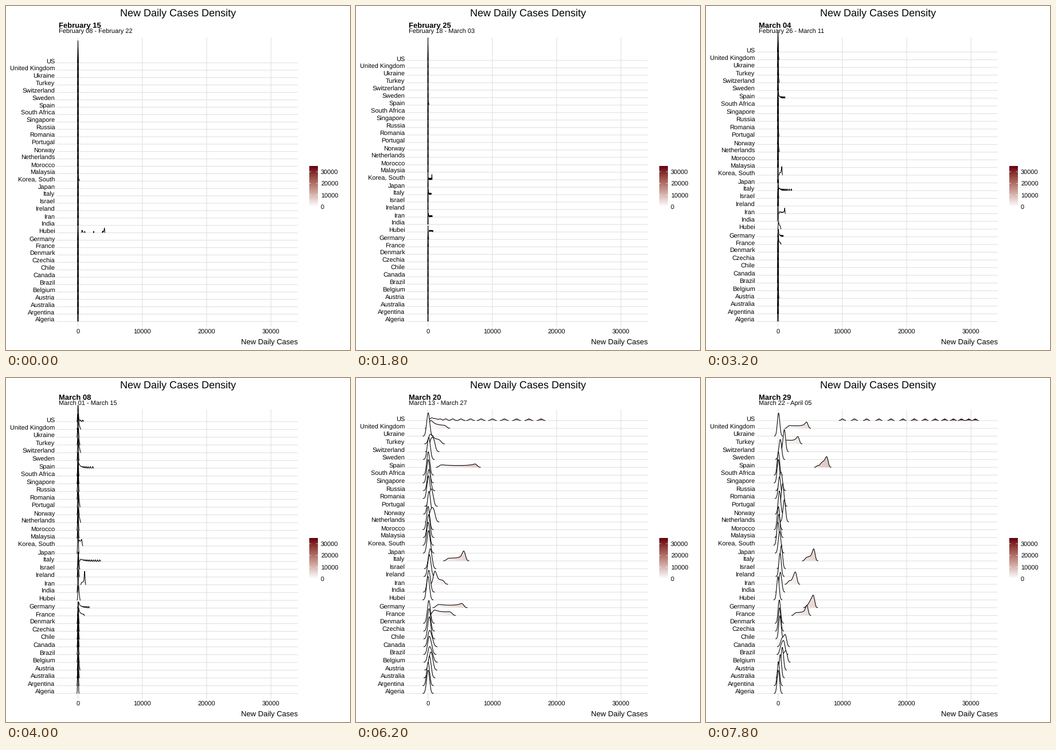
A matplotlib script that plays this animation: 600 px wide and 600 px high, repeating every 8000 ms.

```python
import numpy as np
import matplotlib.pyplot as plt
from matplotlib.animation import FuncAnimation
from matplotlib.colors import LinearSegmentedColormap
from matplotlib.path import Path

plt.rcParams["font.family"] = "Liberation Sans"
plt.rcParams["text.hinting"] = "none"

SIZE, DPI, FRAMES, STEP = 600, 100, 40, 200
PT = 72 / DPI
LEFT, RIGHT, TOP, BOTTOM = 88.5, 509, 55, 560
BASE, SPAN = 550.3, 489.7
VMAX = 34900
GRID = "#e0e0e0"
RED = LinearSegmentedColormap.from_list(
    "red", ["#ffffff", "#dcc0bb", "#bb827a", "#94473f", "#67000d"])


# Daily case curves; days are counted from February 15.
def bell(peak, mid=43, width=9):
    """Rises like a normal curve and falls half as fast again."""
    def curve(day):
        w = np.where(day < mid, width, 1.5 * width)
        return peak * np.exp(-((day - mid) / w) ** 2 / 2)
    return curve


def growth(limit, mid, width):
    return lambda day: limit * np.exp(-np.exp((mid - day) / width))


def cliff(level, mid, width):
    return lambda day: level / (1 + np.exp((day - mid) / width))


def both(a, b):
    return lambda day: a(day) + b(day)


EARLY = {"Australia": 380, "Austria": 720, "Chile": 330, "Czechia": 270,
         "Denmark": 230, "Germany": 5600, "Ireland": 350, "Israel": 560,
         "Malaysia": 160, "Netherlands": 1050, "Norway": 250, "Portugal": 780,
         "Singapore": 60, "South Africa": 70, "Spain": 7700, "Switzerland": 1050}
LATE = {"Algeria": 80, "Argentina": 100, "Belgium": 1350, "Brazil": 1000,
        "Canada": 1250, "India": 500, "Japan": 350, "Morocco": 90,
        "Romania": 330, "Russia": 600, "Sweden": 480, "Turkey": 3200,
        "Ukraine": 130, "United Kingdom": 4550}

CURVES = {name: bell(peak) for name, peak in EARLY.items()}
CURVES |= {name: bell(peak, 50) for name, peak in LATE.items()}
CURVES |= {
    "US": growth(39000, 39.3, 7.5),
    "Italy": bell(5650, 39, 9.9),
    "France": bell(4550, 48, 10.5),
    "Korea, South": bell(620, 15, 5),
    "Iran": both(bell(1050, 24, 7), bell(2700, 45, 6)),
    "Hubei": both(bell(750, 0, 7), cliff(3400, 2, 0.45)),
}
REGIONS = sorted(CURVES, key=str.lower)


def to_px(v):
    return 125.5 + np.asarray(v) * 0.011225


X = np.arange(-1500, 32500, 10.0)
PX = to_px(X)


def densities(day):
    """Kernel densities of two weeks of cases, sharing one bandwidth."""
    days = np.arange(day - 6, day + 8)
    cases = np.array([CURVES[name](days) for name in REGIONS])
    iqr = np.subtract(*np.percentile(cases, [75, 25], axis=1))
    spread = np.minimum(cases.std(axis=1, ddof=1), iqr / 1.34)
    bw = 0.9 * spread.mean() * len(days) ** -0.2
    rows = np.array([np.exp(-((X[:, None] - c) / bw) ** 2 / 2).sum(axis=1)
                     for c in cases])
    return 3 * rows / rows.max()


def row_gap(day):
    return SPAN / (36 + 2 / (1 + np.exp((day - 14.4) / 3)))


def date(day):
    n = 15 + day
    for month, length in (("February", 29), ("March", 31), ("April", 30)):
        if n <= length:
            return f"{month} {n:02d}"
        n -= length


fig = plt.figure(figsize=(SIZE / DPI, SIZE / DPI), dpi=DPI, facecolor="white")
ax = fig.add_axes([0, 0, 1, 1])
ax.axis("off")


def text(x, y, s, px=11, **kw):
    return ax.text(x, y, s, fontsize=px * PT, va="baseline", color="black", **kw)


def line(xs, ys, color, width=1.07, z=0):
    return ax.plot(xs, ys, color=color, lw=width * PT, zorder=z, snap=False,
                   solid_capstyle="butt", solid_joinstyle="round")[0]


text(300, 17, "New Daily Cases Density", 18, ha="center")
text(RIGHT, 590, "New Daily Cases", 13, ha="right")
heading = text(92, 38, "", 13, weight="bold")
period = text(92, 47.6, "")

ax.imshow(np.linspace(1, 0, 256)[:, None], cmap=RED, vmin=0, vmax=1,
          extent=[529, 543.5, 350, 279], aspect="auto")
for v in range(0, 40000, 10000):
    x = to_px(v)
    line([x, x], [TOP, BOTTOM], GRID)
    text(x, 571, str(v), ha="center")
    y = 350 - v * 71 / VMAX
    for x in (529, 540.6):
        line([x, x + 2.9], [y, y], "white", 0.7, 3)
    text(549, y + 4, str(v))

ramp = np.linspace(X[0], X[-1], 500)[None, :]
grid, names, fills, ridges = [], [], [], []
for i, name in enumerate(REGIONS):
    z = 10 + 2 * (len(REGIONS) - i)
    grid.append(line([LEFT, RIGHT], [0, 0], GRID))
    names.append(text(85.5, 0, name, ha="right"))
    fills.append(ax.imshow(ramp, cmap=RED, vmin=0, vmax=VMAX, aspect="auto",
                           interpolation="bilinear", zorder=z))
    ridges.append(line([], [], "black", 1.07, z + 1))

ax.autoscale(False)
ax.set(xlim=(0, SIZE), ylim=(SIZE, 0))


def draw(frame):
    day = round(frame * 43 / 39)
    heading.set_text(date(day))
    period.set_text(f"{date(day - 7)} - {date(day + 7)}")
    gap = row_gap(day)
    for i, h in enumerate(densities(day)):
        base = BASE - i * gap
        grid[i].set_ydata([base, base])
        names[i].set_y(base + 0.9)
        shown = h > 0.003
        y = base - h * gap
        ridges[i].set_data(PX, np.where(shown, y, np.nan))

        at = np.flatnonzero(shown)
        part = slice(at[0], at[-1] + 1)
        xs = PX[part]
        ys = np.where(shown, y, base)[part]
        outline = np.column_stack([np.r_[xs[0], xs, xs[-1]], np.r_[base, ys, base]])
        fills[i].set_extent([PX[0], PX[-1], base, ys.min() - 1])
        fills[i].set_clip_path(Path(outline), ax.transData)
    return []


anim = FuncAnimation(fig, draw, frames=FRAMES, interval=STEP, repeat=True,
                     repeat_delay=0, init_func=lambda: draw(0), blit=False)
plt.show()
```
